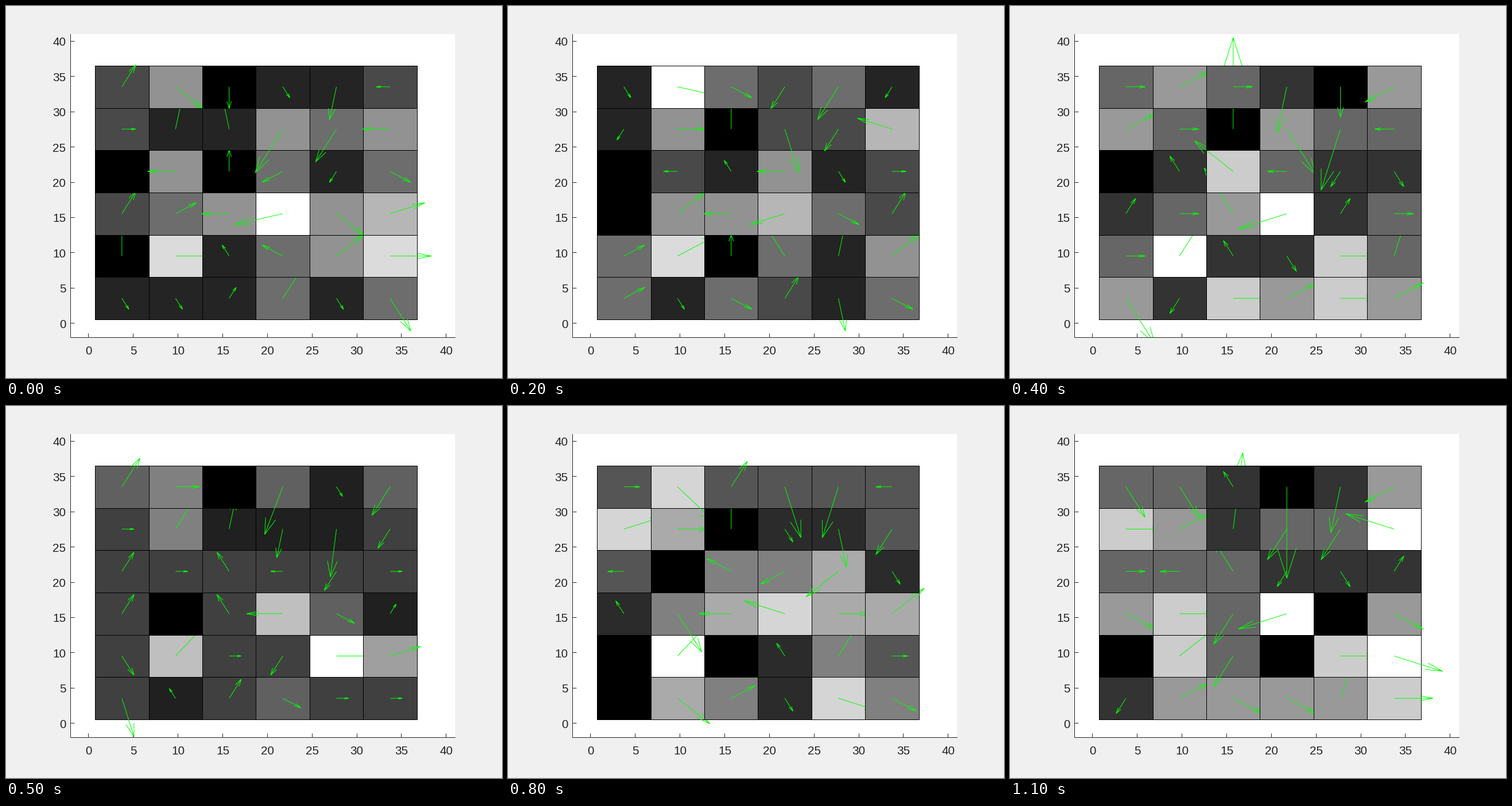
Write a matplotlib script that moves like this. It is 864 px wide and 648 px high and loops after 1.2 s.

```python
import numpy as np
import matplotlib.pyplot as plt
from matplotlib.animation import FuncAnimation
from matplotlib.patches import Rectangle

W, H, DPI = 864, 648, 100
PX = 72 / DPI                     # one pixel in points
INK, GREEN = "#262626", (0, 1, 0)
STEPS, N, CELL = 12, 6, 6
AXES = (0.13, 0.11, 0.775, 0.815)
LOW, HIGH = -2, 41

# Mean flow of the gas: column, row from the top, and strength (x, y) of each jet.
JETS = [
    (1.0, 0.0, 4.5, -1.5),
    (0.0, 0.5, 2.0, 2.0),
    (2.0, 1.2, 0.0, 4.5),
    (3.2, 0.5, 0.0, -5.0),
    (4.8, 0.5, -2.5, -1.0),
    (1.0, 3.6, 5.0, 2.5),
    (2.6, 3.2, -7.5, -1.5),
    (4.5, 3.0, 4.0, 1.0),
    (4.2, 4.5, 5.0, 1.0),
    (2.3, 5.2, 3.0, 1.0),
]


def drift():
    row, col = np.mgrid[:N, :N]
    flow = np.zeros((N, N, 2))
    for c, r, u, v in JETS:
        reach = np.exp(-((col - c) ** 2 + (row - r) ** 2) / 0.9)
        flow += reach[..., None] * (u, v)
    return flow


def evolve(keep=0.45, spread=1.6):
    """Block momentum of a hexagonal lattice gas: x and y / 2 share parity."""
    rng = np.random.default_rng(7)
    mean = drift()
    dev = rng.normal(0, spread, mean.shape)
    states = []
    for _ in range(STEPS):
        x, y = np.moveaxis(mean + dev, -1, 0)
        y = np.round(y)
        odd = y % 2
        x = odd + 2 * np.round((x - odd) / 2)
        states.append(np.stack([x, 2 * y], -1))
        dev = keep * dev + rng.normal(0, spread * np.sqrt(1 - keep ** 2), mean.shape)
    return states


def arrow(x, y, u, v, head=0.33, spread=0.25):
    if u == 0 and v == 0:
        return [], []
    tx, ty = x + u, y + v
    bx, by = tx - head * u, ty - head * v
    wx, wy = head * spread * v, head * spread * u
    return ([x, tx, np.nan, bx - wx, tx, bx + wx],
            [y, ty, np.nan, by + wy, ty, by - wy])


fig = plt.figure(figsize=(W / DPI, H / DPI), dpi=DPI, facecolor="#f0f0f0")
ax = fig.add_axes(AXES)
ax.set(xlim=(LOW, HIGH), ylim=(LOW, HIGH), facecolor="white")
ticks = range(0, 41, 5)
ax.set_xticks(ticks, [])
ax.set_yticks(ticks, [])
ax.tick_params(direction="in", length=6.7 * PX, width=PX, color=INK)
for side, spine in ax.spines.items():
    spine.set(color=INK, linewidth=PX, visible=side in ("left", "bottom"))

font = dict(family="Liberation Sans", size=20.8 * PX, color=INK, va="baseline")
left, bottom, width, height = AXES
for t in ticks:
    part = (t - LOW) / (HIGH - LOW)
    fig.text(left + part * width + 0.5 / W, bottom - 30 / H, str(t), ha="center", **font)
    fig.text(left - 8 / W, bottom + part * height - 8.5 / H, str(t), ha="right", **font)

# Columns left to right, each from the bottom up: later blocks hide earlier arrows.
blocks = []
for col in range(N):
    for row in reversed(range(N)):
        x, y = 0.75 + CELL * col, 0.5 + CELL * (N - 1 - row)
        z = 3 + 2 * len(blocks)
        rect = ax.add_patch(Rectangle((x, y), CELL, CELL, ec="black", lw=PX, zorder=z))
        line, = ax.plot([], [], color=GREEN, lw=PX, zorder=z + 1, solid_capstyle="butt")
        blocks.append((row, col, x + CELL / 2, y + CELL / 2, rect, line))

states = evolve()


def draw(i):
    flow = states[i]
    peak = np.abs(flow[..., 0]).max()
    scale = 0.9 * CELL / peak
    for row, col, x, y, rect, line in blocks:
        u, v = flow[row, col]
        rect.set_facecolor(str(abs(u) / peak))
        line.set_data(*arrow(x, y, u * scale, v * scale))
    return [b[4] for b in blocks] + [b[5] for b in blocks]


anim = FuncAnimation(fig, draw, frames=STEPS, interval=100, repeat=True,
                     repeat_delay=0, blit=False)
plt.show()
```
